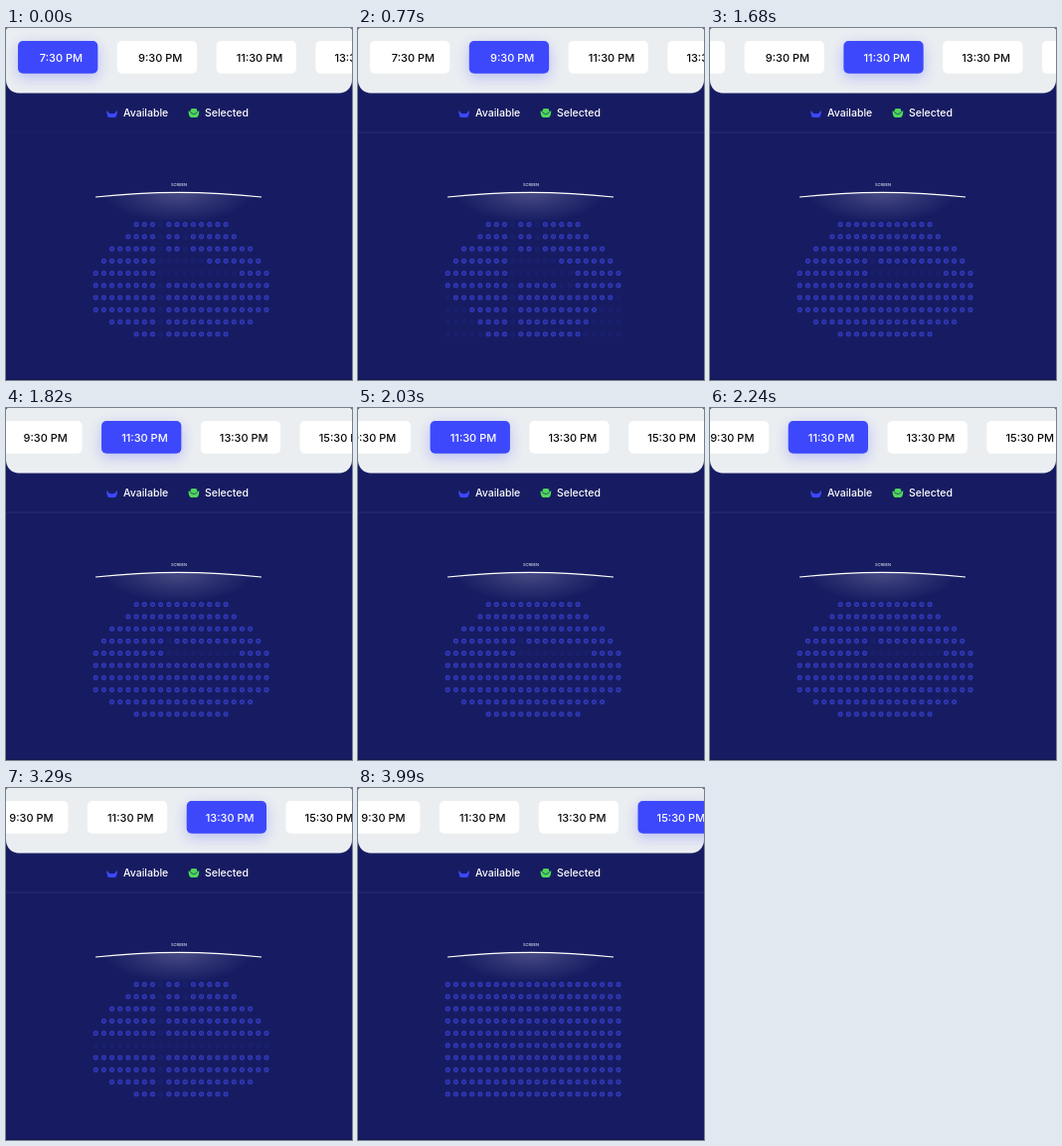
These frames come from a looping animation (348 by 354 pixels, 4.34 s). An HTML page with a canvas:

```html
<!DOCTYPE html>
<html lang="en">
<head>
<meta charset="utf-8">
<title>Showtime picker</title>
<style>
  html, body { margin: 0; width: 100%; height: 100%; overflow: hidden; background: #171c62; }
  canvas { display: block; width: 348px; height: 354px; }
</style>
</head>
<body>
<canvas></canvas>
<script>
const LOOP = 4340, STEP = 70, W = 348, H = 354;
const canvas = document.querySelector('canvas');
const ctx = canvas.getContext('2d');
const dpr = window.devicePixelRatio || 1;
canvas.width = W * dpr;
canvas.height = H * dpr;
ctx.scale(dpr, dpr);

const times = ['7:30 PM', '9:30 PM', '11:30 PM', '13:30 PM', '15:30 PM'];
// When each next showtime gets selected: [start, duration]
const switches = [[490, 280], [1190, 210], [3080, 210], [3780, 210]];

const clamp = v => Math.min(1, Math.max(0, v));
const within = (v, a, b) => v >= a && v <= b;
const mix = (a, b, p) => `rgb(${a.map((v, i) => Math.round(v + (b[i] - v) * p))})`;
const WHITE = [255, 255, 255], BLACK = [10, 10, 14], BLUE = [61, 72, 252];

function roundRect(x, y, w, h, r) {
  ctx.beginPath();
  ctx.roundRect(x, y, w, h, r);
}

function label(text, x, y, size, color, align = 'left') {
  ctx.font = `500 ${size}px Inter, sans-serif`;
  ctx.textAlign = align;
  ctx.fillStyle = color;
  ctx.fillText(text, x, y);
}

// Drag past the end, then spring back to rest
function scrollAt(t) {
  const rest = 129.7, peak = 139;
  if (t < 2030) return peak * Math.sin(clamp((t - 1470) / 560) * Math.PI / 2);
  const k = (t - 2030) * 0.0107;
  return rest + (peak - rest) * (1 + k) * Math.exp(-k);
}

// Seats: first column of each row, and the taken seats per showtime
const firstCol = [5, 4, 2, 1, 0, 0, 0, 0, 2, 5];
const narrowed = [5, 4, 2, 1, 0, 0, 1, 3, 4, 5];
const inside = (starts, r, c) => within(c, starts[r], 21 - starts[r]);
const taken = [
  (r, c) => c === 8 || (c === 11 && within(r, 1, 2)) ||
    (r === 3 && within(c, 8, 13)) || (r === 4 && within(c, 8, 17)),
  (r, c) => c === 8 || (c === 11 && r < 3) || (r === 3 && within(c, 8, 13)) ||
    (r === 4 && within(c, 8, 15)) || (r === 5 && within(c, 14, 15)) || !inside(narrowed, r, c),
  (r, c) => (r === 3 && c === 9) || (r === 4 && within(c, 9, 17)),
  (r, c) => c === 8 || r === 5 || (c === 11 && r < 2),
  () => false
];

function seatLevel(show, r, c) {
  const present = show === 4 || (show === 1 && r > 5) || inside(firstCol, r, c);
  return present ? (taken[show](r, c) ? 0.13 : 1) : 0;
}

function drawSeats(weights) {
  for (let r = 0; r < 10; r++) {
    for (let c = 0; c < 22; c++) {
      const level = weights.reduce((sum, w, show) => sum + w * seatLevel(show, r, c), 0);
      if (!level) continue;
      const x = 90.2 + c * 8.18, y = 197.6 + r * 12.26;
      ctx.globalAlpha = level;
      roundRect(x - 1.9, y - 1.9, 3.8, 3.8, 0.9);
      ctx.fillStyle = '#262c92';
      ctx.fill();
      ctx.strokeStyle = '#3840cf';
      ctx.lineWidth = 1;
      ctx.stroke();
    }
  }
  ctx.globalAlpha = 1;
}

function drawHeader(scroll, weights) {
  ctx.save();
  roundRect(0, 0, W, 65.5, [2, 2, 13, 13]);
  ctx.fillStyle = '#ebeef1';
  ctx.fill();
  ctx.clip();
  times.forEach((time, i) => {
    const x = 12 + i * 99.8 - scroll, p = weights[i];
    ctx.save();
    ctx.shadowColor = `rgba(61, 72, 252, ${0.3 * p})`;
    ctx.shadowBlur = 14 * dpr;
    ctx.shadowOffsetY = 4 * dpr;
    roundRect(x, 13, 80.3, 32.7, 5);
    ctx.fillStyle = mix(WHITE, BLUE, p);
    ctx.fill();
    ctx.restore();
    label(time, x + 43.4, 33.5, 11, mix(BLACK, WHITE, p), 'center');
  });
  ctx.restore();
}

function drawSeatIcon(x, color, filled) {
  ctx.fillStyle = color;
  if (filled) {
    roundRect(x + 2, 81, 6.8, 6, 2);
    ctx.fill();
  }
  ctx.beginPath();
  ctx.moveTo(x, 83.6);
  ctx.quadraticCurveTo(x + 1.7, 83, x + 2.2, 85.6);
  ctx.quadraticCurveTo(x + 5.4, 87, x + 8.6, 85.6);
  ctx.quadraticCurveTo(x + 9.1, 83, x + 10.8, 83.6);
  ctx.quadraticCurveTo(x + 10.6, 90, x + 8, 90);
  ctx.lineTo(x + 2.8, 90);
  ctx.quadraticCurveTo(x + 0.2, 90, x, 83.6);
  ctx.fill();
  if (filled) {
    ctx.beginPath();
    ctx.moveTo(x + 2.4, 85.3);
    ctx.quadraticCurveTo(x + 5.4, 88, x + 8.4, 85.3);
    ctx.strokeStyle = '#1c4a62';
    ctx.lineWidth = 0.9;
    ctx.stroke();
  }
}

function drawLegend(t) {
  drawSeatIcon(101.2, '#3d48fc', false);
  label('Available', 118, 89, 10.5, '#fff');
  drawSeatIcon(183.5, '#4fd65a', true);
  label('Selected', 200, 89, 10.5, '#fff');
  ctx.fillStyle = t < STEP ? '#1b2067' : '#282d70';
  ctx.fillRect(0, 104.5, W, 1);
}

function drawScreen() {
  label('SCREEN', 174, 158.8, 4, '#dcdeed', 'center');
  ctx.beginPath();
  ctx.moveTo(90, 170);
  ctx.quadraticCurveTo(173.5, 160.6, 257, 170);
  ctx.strokeStyle = '#fff';
  ctx.lineWidth = 1.2;
  ctx.stroke();

  // Soft light falling below the screen
  ctx.save();
  ctx.lineTo(257, 200);
  ctx.lineTo(90, 200);
  ctx.clip();
  ctx.translate(173.5, 165);
  ctx.scale(1, 0.4);
  const glow = ctx.createRadialGradient(0, 0, 0, 0, 0, 76);
  glow.addColorStop(0, 'rgba(255, 255, 255, 0.22)');
  glow.addColorStop(0.5, 'rgba(255, 255, 255, 0.1)');
  glow.addColorStop(1, 'rgba(255, 255, 255, 0)');
  ctx.fillStyle = glow;
  ctx.fillRect(-84, -10, 168, 90);
  ctx.restore();
}

function draw(t) {
  const selected = switches.reduce((sum, [start, length]) => sum + clamp((t - start) / length), 0);
  const weights = times.map((_, i) => clamp(1 - Math.abs(selected - i)));
  ctx.fillStyle = '#171c62';
  ctx.fillRect(0, 0, W, H);
  drawHeader(scrollAt(t), weights);
  drawLegend(t);
  drawScreen();
  drawSeats(weights);
  ctx.fillStyle = 'rgba(0, 0, 0, 0.25)';
  ctx.fillRect(0, H - 1, W, 1);
}

const begin = performance.now();
function tick() {
  const t = (performance.now() - begin) % LOOP;
  draw(Math.floor(t / STEP) * STEP);
  requestAnimationFrame(tick);
}
tick();
</script>
</body>
</html>
```
